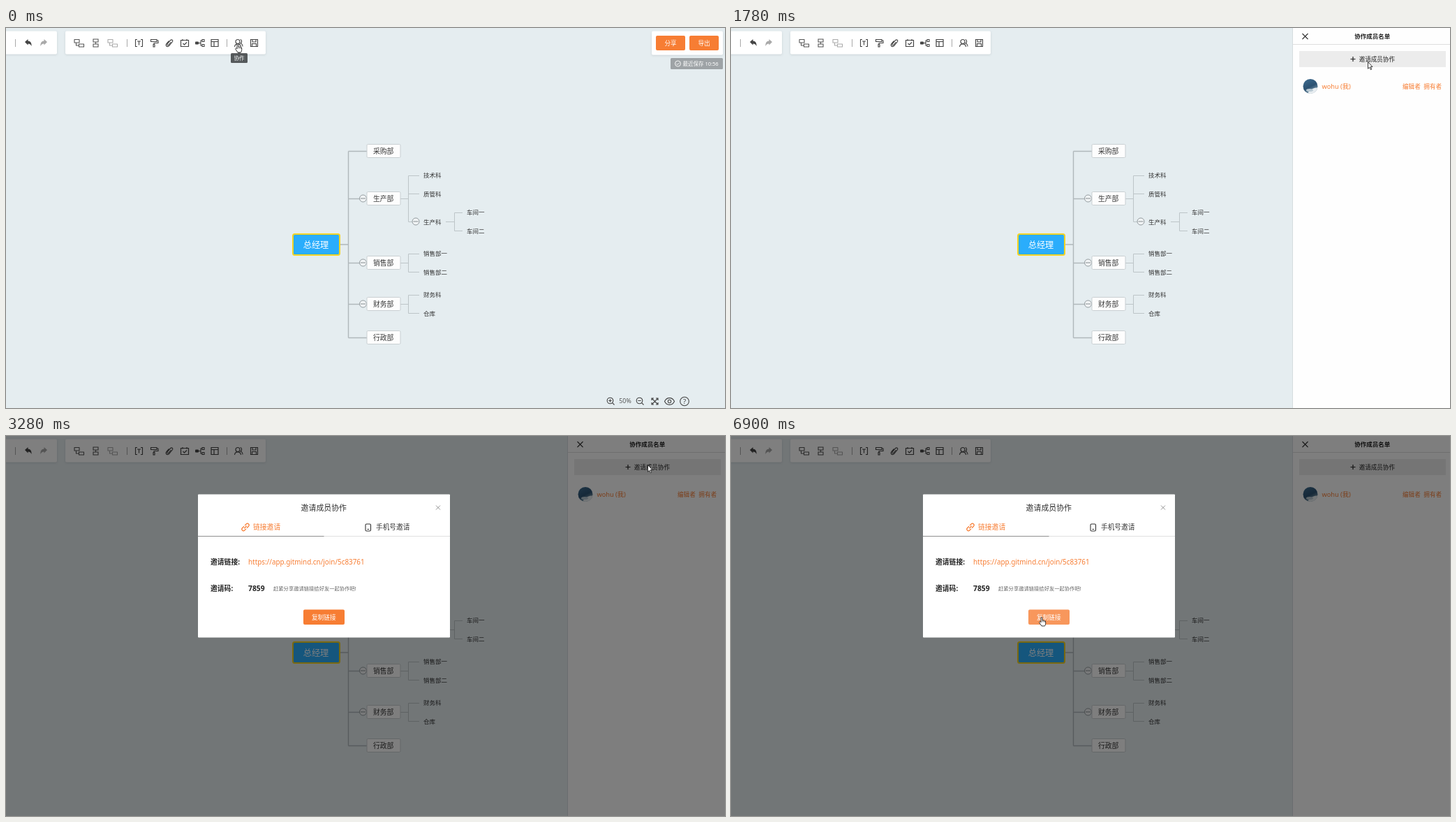
An HTML page that plays this animation: 1030x544 px, repeating every 8 s.

```html
<!DOCTYPE html>
<html lang="zh-CN">
<head>
<meta charset="utf-8">
<title>思维导图协作</title>
<style>
  html, body { margin: 0; width: 100%; height: 100%; overflow: hidden; background: #e5edf0; }
  svg { display: block; width: 100vw; height: 100vh; }
  text { font-family: "Noto Sans", "Noto Sans CJK SC", "Noto Sans CJK", sans-serif; white-space: pre; }
</style>
</head>
<body>
<svg id="stage" viewBox="0 0 1030 544" xmlns="http://www.w3.org/2000/svg"></svg>
<script>
const LOOP = 8000;
const ORANGE = '#f77d33', INK = '#333';

// Drawing helpers; text is placed by its left edge or middle and its vertical centre.
const text = (x, yc, str, size, fill = INK, extra = '') =>
  `<text x="${x}" y="${yc + size * 0.37}" font-size="${size}" fill="${fill}" ${extra}>${str}</text>`;
const mid = (x, yc, str, size, fill, extra = '') =>
  text(x, yc, str, size, fill, 'text-anchor="middle" ' + extra);
const rect = (x, y, w, h, fill, extra = '') =>
  `<rect x="${x}" y="${y}" width="${w}" height="${h}" fill="${fill}" ${extra}/>`;
const path = (d, stroke = '#444', width = 1, extra = '') =>
  `<path d="${d}" fill="none" stroke="${stroke}" stroke-width="${width}" ${extra}/>`;
const circle = (x, y, r, fill, extra = '') =>
  `<circle cx="${x}" cy="${y}" r="${r}" fill="${fill}" ${extra}/>`;
const group = (id, body, extra = '') => `<g id="${id}" ${extra}>${body}</g>`;
const at = (x, y, body) => `<g transform="translate(${x} ${y})">${body}</g>`;
const BOLD = 'font-weight="700"';

const fold = (x, y) => circle(x, y, 5, '#f1f4f5', 'stroke="#929a9e"') + path(`M${x - 3.5} ${y}h7`, '#858c90');

function branch(x0, y0, x, ys, x1, color = '#bdc5c8', width = 1) {
  const ends = ys.map(y => `M${x} ${y}H${x1}`).join('');
  return path(`M${x0} ${y0}H${x}M${x} ${ys[0]}V${ys[ys.length - 1]}${ends}`, color, width);
}

function mindMap() {
  const depts = [['采购部', 176], ['生产部', 244], ['销售部', 336], ['财务部', 395], ['行政部', 443]];
  const leaves = [
    ['技术科', 598, 211], ['质管科', 598, 237.5], ['生产科', 598, 277.5], ['车间一', 660, 264],
    ['车间二', 660, 290.5], ['销售部一', 598, 323], ['销售部二', 598, 349.5],
    ['财务科', 598, 382], ['仓库', 598, 408.5]];
  return branch(478, 310, 490.5, depts.map(d => d[1] + .5), 517, '#b0b8bb', 1.4)
    + branch(565, 244.5, 576.5, [211.5, 237.5, 277.5], 592)
    + branch(630, 277.5, 642.5, [264.5, 290.5], 654)
    + branch(565, 336.5, 576.5, [323.5, 349.5], 592)
    + branch(565, 395.5, 576.5, [382.5, 408.5], 592)
    + rect(582, 272, 13, 11, '#e5edf0')
    + fold(511.5, 244) + fold(511.5, 336) + fold(511.5, 395) + fold(587, 277)
    + depts.map(([name, y]) =>
        rect(517, y - 9.5, 48, 19, '#fdfdfd', 'rx="1.5" stroke="#c9cfd2"') + mid(540.7, y + .3, name, 9.8)).join('')
    + leaves.map(([name, x, y]) => text(x, y, name, 8.5)).join('')
    + rect(411, 295, 67, 30, '#2aadfc', 'rx="2.5" stroke="#f3d423" stroke-width="2"')
    + mid(444, 310.3, '总经理', 12.2, '#fff');
}

function topBars() {
  const card = (x, w, h = 33) => rect(x, 4.5, w, h, '#fff', 'rx="2" filter="url(#soft)"');
  const sep = x => path(`M${x}.5 16V27`, '#aaa');
  const link = (x, color) => at(x, 21.5,
    path('M-7-5h7v4.500h-7zM-4.500-.5V3.500h4M-.5 1.500h7v4h-7z', color, 1.1, 'stroke-linejoin="round"'));
  const turn = (x, flip, color) => `<path transform="translate(${x} 21.500) scale(${flip} 1)"
    d="M-5-1.500L-.5-5.500V-3C3-3 5 0 4.500 4.500C3.500 2 2 1-.5 1V3z" fill="${color}"/>`;
  return card(-10, 83) + sep(13) + turn(32, 1, '#444') + turn(54, -1, '#a9a9a9')
    + card(85, 287)
    + link(105, '#555') + link(153, '#aaa')
    + at(128.5, 21.5, path('M-3.500-5.500h7v4h-7zM-3.500 1.500h7v4h-7zM0-1.500v3', '#555', 1.1))
    + sep(173)
    + at(190.5, 21.5, path('M-2.500-5h-2.500v10h2.500M2.500-5h2.500v10h-2.500M-2.500-2.500h5M0-2.500v5.500', '#444', 1.1))
    + at(212.5, 21.5, path('M-5-5h8.500v3h-8.500zM3.500-3.500h2v3.500h-6v2M-1.500 2h2v3.500h-2z', '#444', 1.1))
    + at(234, 21.5, path('M2.500-1.500L-1.200 2.800C-2.500 4-4 2.500-2.800 1.200L1.500-3.800C3.500-6 6-3.500 4.200-1.500L-.3 3.800C-3 7-6.500 3.500-4 .8L-.5-3.200', '#444', 1.1))
    + at(256, 21.5, path('M-5.500-4h11v9h-11zM-3-5.500v2.500M3-5.500v2.500M-2.500.5L-.5 2.500L3-1', '#444', 1.2))
    + at(277.5, 21.5, rect(-6.5, -2, 5, 4, '#444', 'rx="1"')
        + path('M-2 0h3.500M4-3.500h-2.500v7h2.500M3.500-5h3v3h-3zM3.500 2h3v3h-3z', '#444', 1.1))
    + at(299, 21.5, path('M-5-5h10v10h-10zM-5-2h10M-1-2v7', '#444', 1.2))
    + sep(316)
    + at(333, 21.5, circle(-1, -2, 3, 'none', 'stroke="#444" stroke-width="1.1"')
        + path('M-5.500 5.500C-5 0 3 0 3.500 5.500M2.500-5C5-5 5.500-1 3 .5C5 1 6 3 6 5', '#444', 1.1))
    + at(355.5, 21.5, path('M-5-5h10v10h-10zM-2.500-5v3.500h5v-3.500M-3 5v-4h6v4', '#444', 1.1))
    + card(925, 102, 34)
    + rect(931, 11, 42, 21, ORANGE, 'rx="2"') + mid(952, 21.5, '分享', 8.6, '#fff')
    + rect(979, 11, 42, 21, ORANGE, 'rx="2"') + mid(1000, 21.5, '导出', 8.6, '#fff')
    + rect(952, 43, 75, 16, '#9ea3a6', 'rx="1.5"')
    + circle(962.5, 51, 4, 'none', 'stroke="#fff" stroke-width=".9"') + path('M960.500 51l1.500 1.500l2.800-2.800', '#fff', .9)
    + text(969.5, 51, '最近保存 10:56', 7.5, '#fff');
}

function viewTools() {
  const lens = (x, inner) => at(x, 534, circle(-.5, -.5, 4.3, 'none', 'stroke="#444" stroke-width="1.1"')
    + path('M2.700 2.700L5.500 5.500M-2.700-.5h4.400' + inner, '#444', 1.1));
  return lens(866, 'M-.5-2.700v4.400') + mid(887, 534, '50%', 8.8, '#555') + lens(908, '')
    + at(929.5, 534.5, path('M-4.500-1.500v-3h3M1.500-4.500h3v3M4.500 1.500v3h-3M-1.500 4.500h-3v-3M-4.500-4.500l9 9M4.500-4.500l-9 9', '#444', 1.1))
    + at(950.5, 534.5, path('M-7 0C-4-6.500 4-6.500 7 0C4 6.500-4 6.500-7 0z', '#444', 1.1)
        + circle(0, 0, 2.2, 'none', 'stroke="#444" stroke-width="1.1"'))
    + circle(972, 534.5, 6.3, 'none', 'stroke="#444" stroke-width="1.1"') + mid(972, 534.5, '?', 9.5, '#444');
}

function sidePanel() {
  return rect(805, 0, 225, 544, '#fefefe') + path('M804.500 0V544', '#d5dcdf')
    + path('M805 23.500H1030', '#dedede')
    + path('M818.500 8l8 8M826.500 8l-8 8', '#333', 1.1)
    + mid(918.8, 11.8, '协作成员名单', 8.5, '#222', BOLD)
    + rect(814, 33, 210, 23, '#ececec', 'id="hover"')
    + path('M887.500 44.500h7M891 41v7', '#222', 1.2)
    + text(899.7, 44.7, '邀请成员协作', 8.55, '#222', 'font-weight="500"')
    + `<g clip-path="url(#round)">${rect(819, 73, 22, 22, 'url(#sky)')}
       <ellipse cx="835" cy="91" rx="9" ry="4.500" fill="#e8edf0" transform="rotate(-25 835 91)"/>
       <ellipse cx="829" cy="89" rx="5" ry="2" fill="#b9c9d3"/></g>`
    + text(846.5, 84, 'wohu (我)', 9.2, ORANGE)
    + text(962, 84.2, '编辑者', 8.6, ORANGE) + text(992.3, 84.2, '拥有者', 8.6, ORANGE);
}

function dialog() {
  const body = mid(455.3, 103.3, '邀请成员协作', 10.9)
    + path('M616 99.500l6 6M622 99.500l-6 6', '#888', .9)
    + at(343, 130.5, `<g transform="rotate(-45)">${
        path('M1-2.300h3a2.300 2.300 0 0 1 0 4.600h-3.500M-1 2.300h-3a2.300 2.300 0 0 1 0-4.600h3.500M-2.500 0h5', ORANGE, 1.2)}</g>`)
    + text(354, 130.5, '链接邀请', 9.8, ORANGE)
    + rect(515, 126, 7.5, 10, 'none', 'rx="1.5" stroke="#333" stroke-width="1.1"') + path('M517.500 133.500h2.500', INK)
    + text(530, 130.5, '手机号邀请', 9.7)
    + text(293, 180.7, '邀请链接:', 9.8, '#222', BOLD)
    + text(347, 180.7, 'https://app.gitmind.cn/join/5c83761', 9.86, ORANGE)
    + text(293, 218, '邀请码:', 9.8, '#222', BOLD)
    + text(347, 218, '7859', 10.3, '#222', BOLD)
    + text(383, 218.3, '赶紧分享邀请链接给好友一起协作吧!', 7.3, '#666')
    + rect(426, 248.5, 59, 21.5, ORANGE, 'id="copy" rx="2"')
    + mid(455.3, 259.3, '复制链接', 8.7, '#fff', 'font-weight="500"');
  return rect(275, 83.5, 361, 205, '#fff', 'rx="1"') + path('M275 143.500H636', '#e0e0e0')
    + path('M275 143.500H455.500', '#8f8f8f', 1, 'id="underline"') + group('content', body);
}

const arrow = `<path d="M.5.5V10.300L2.700 8.200L4.300 11.700L5.800 11L4.200 7.600H7z" fill="#fff" stroke="#222" stroke-width=".9"/>`;
const hand = `<path d="M3 7V1.500Q3 .5 4 .5T5 1.500V5Q6 4.300 6.800 5.300Q7.800 4.800 8.400 5.700Q9.700 5.500 9.700 7V9.500Q9.500 11.500 8.500 13H4L.9 8.500Q.5 7 1.600 6.700Q2.400 6.600 3 7.700z"
  fill="#fff" stroke="#222" stroke-width=".9"/>` + path('M5 5v2.500M6.800 5.500v2M8.400 6v1.500', '#222', .6);

const stage = document.getElementById('stage');
stage.innerHTML = `<defs>
    <filter id="soft" x="-10%" y="-20%" width="120%" height="150%">
      <feDropShadow dx="0" dy="1" stdDeviation="1.5" flood-color="#5b6a70" flood-opacity=".22"/></filter>
    <linearGradient id="sky" x2=".5" y2="1"><stop stop-color="#3f6e92"/><stop offset=".6" stop-color="#2c5272"/><stop offset="1" stop-color="#8fa9b8"/></linearGradient>
    <clipPath id="round"><circle cx="830" cy="83.500" r="10.500"/></clipPath>
  </defs>`
  + rect(0, 0, 1030, 544, '#e5edf0') + mindMap() + topBars() + viewTools()
  + group('tip', rect(322, 36, 24, 14, '#1f2123', 'rx="1.5"') + '<path d="M331 36.500l3-2.500l3 2.500z" fill="#1f2123"/>'
      + mid(334, 43, '协作', 7.5, '#fff'))
  + group('panel', sidePanel())
  + rect(0, 0, 1030, 544, '#000', 'id="shade"')
  + group('dialog', dialog())
  + group('arrow', arrow) + group('hand', hand);

// Every track holds its value until the next entry: [time, value...].
const tracks = {
  tip: [[0, .72], [150, .96], [940, .45], [1060, 0]],
  panel: [[0, 1040], [400, 945], [550, 852], [680, 814], [820, 805]],
  hover: [[0, 0], [1660, .6], [1780, 1]],
  shade: [[0, 0], [2880, .032], [3000, .47], [3130, .5]],
  dialog: [[0, 0, -10], [2880, .025, -9.5], [3000, .82, -2.5], [3130, 1, 0]],
  content: [[0, 0], [3130, -.5], [3280, 0]],
  cursor: [
    [0, 328, 22], [400, 328, 23], [940, 352, 34], [1060, 420, 58], [1180, 530, 88], [1300, 660, 106],
    [1420, 775, 106], [1540, 845, 95], [1660, 886, 66], [1780, 912, 48], [1900, 924, 44],
    [2050, 916, 43], [2170, 919, 41], [3560, 879, 103], [3710, 690, 190], [3830, 430, 251],
    [3950, 328, 234], [4200, 339, 234], [4350, 374.5, 227], [4470, 387, 228], [4590, 390, 227],
    [4840, 371, 203], [4960, 352, 179], [5110, 364, 177], [5230, 392, 184], [5350, 424, 201],
    [5470, 447, 219], [5620, 446, 247], [5740, 436, 264], [5890, 442, 260], [6010, 444, 259],
    [6130, 446, 258], [6380, 462, 258], [6660, 456, 259], [6780, 446, 260], [6900, 441, 259]],
};

function hold(track, t) {
  let now = track[0];
  for (const key of track) if (key[0] <= t) now = key;
  return now.slice(1);
}

const el = id => document.getElementById(id);
const set = (id, name, value) => el(id).setAttribute(name, value);
const move = (id, x, y) => set(id, 'transform', `translate(${x} ${y})`);

function draw(t) {
  for (const id of ['tip', 'hover', 'shade']) set(id, 'opacity', hold(tracks[id], t)[0]);
  move('panel', hold(tracks.panel, t)[0] - 805, 0);

  const [alpha, drop] = hold(tracks.dialog, t);
  set('dialog', 'opacity', alpha);
  move('dialog', 0, drop);
  move('content', 0, hold(tracks.content, t)[0]);
  set('underline', 'stroke', t < 3130 ? ORANGE : '#8f8f8f');

  const onCopy = t >= 5620;
  set('copy', 'fill', onCopy ? '#f8975c' : ORANGE);
  const pointing = t < 940 || onCopy;
  const [x, y] = hold(tracks.cursor, t);
  set('hand', 'visibility', pointing ? 'visible' : 'hidden');
  set('arrow', 'visibility', pointing ? 'hidden' : 'visible');
  move(pointing ? 'hand' : 'arrow', x, y);
}

function tick() {
  draw(performance.now() % LOOP);
  requestAnimationFrame(tick);
}
tick();
</script>
</body>
</html>
```
